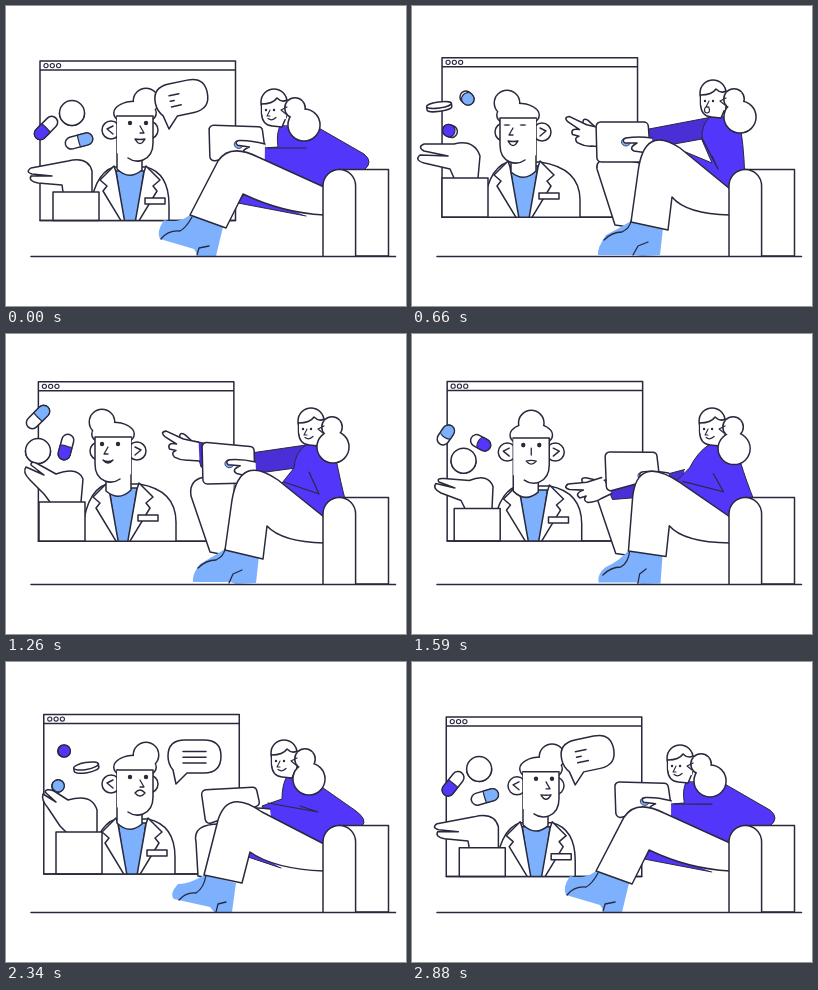
An HTML page with a canvas that plays this animation: 400x300 px, repeating every 2.91 s.

```html
<!DOCTYPE html>
<html lang="en">
<head>
<meta charset="utf-8">
<style>
html, body { margin: 0; width: 100%; height: 100%; overflow: hidden; background: #fff; }
canvas { display: block; }
</style>
</head>
<body>
<canvas id="stage" width="400" height="300"></canvas>
<script>
const ctx = document.getElementById('stage').getContext('2d');
const LOOP = 2910, KEYS = [0, 240, 660, 1260, 1920, 2340];
const INK = '#29293d', VIOLET = '#5236fa', SHADE = '#4a2fd6', BLUE = '#7db1fe', WHITE = '#fff';
const TAU = Math.PI * 2, NUM = /-?[\d.]+/g;
let t = 0;

// Smooth periodic interpolation through one value per key time
function ease(v) {
  const n = KEYS.length;
  const time = i => KEYS[(i + n) % n] + LOOP * Math.floor(i / n);
  const val = i => v[(i + n) % n];
  const rate = i => (val(i + 1) - val(i)) / (time(i + 1) - time(i));
  const slope = i => rate(i - 1) * rate(i) <= 0 ? 0
    : 2 * rate(i - 1) * rate(i) / (rate(i - 1) + rate(i));
  let i = n - 1;
  while (KEYS[i] > t) i--;
  const d = time(i + 1) - time(i), u = (t - time(i)) / d, w = 1 - u;
  return w * w * (1 + 2 * u) * val(i) + u * u * (3 - 2 * u) * val(i + 1)
    + d * u * w * (w * slope(i) - u * slope(i + 1));
}

// Poses are six strings of the same structure, separated by bars
const cache = {};
function pose(text) {
  const p = cache[text] ||= text.split('|').map(s => s.match(NUM).map(Number));
  return p[0].map((_, i) => ease(p.map(q => q[i])));
}
function morph(text) {
  const v = pose(text);
  let i = 0;
  return text.split('|')[0].replace(NUM, () => v[i++].toFixed(2));
}
const ramp = (a, b) => Math.min(1, Math.max(0, (t - a) / (b - a)));

function draw(path, fill, line = 1.5) {
  const p = typeof path === 'string' ? new Path2D(path) : path;
  if (fill) { ctx.fillStyle = fill; ctx.fill(p); }
  if (line) { ctx.lineWidth = line; ctx.stroke(p); }
}
function oval(x, y, rx, ry = rx) {
  const p = new Path2D();
  p.ellipse(x, y, rx, ry, 0, 0, TAU);
  return p;
}
// Overlapping shapes with a single outline; only its outer half stays visible
function union(...shapes) {
  shapes.forEach(s => draw(s, WHITE, 3));
  shapes.forEach(s => draw(s, WHITE, 0));
}
function at(x, y, deg, fn) {
  ctx.save();
  ctx.translate(x, y);
  ctx.rotate(deg * Math.PI / 180);
  fn();
  ctx.restore();
}

function browser(x, y) {
  draw(`M${x} ${y}h195.5v159.5h-195.5z m0 9h195.5`, WHITE);
  for (let i = 0; i < 3; i++) draw(oval(x + 6 + i * 6.3, y + 4.6, 2.1), WHITE, 1.1);
}

function doctorBody(floor) {
  const [x, y, right] = pose('124 163 39|117 168 50|112 158 56|117 152 53|125 157 44|126 159 43');
  ctx.save();
  ctx.beginPath();
  ctx.rect(0, 0, 400, floor);
  ctx.clip();
  at(x, y, 0, () => {
    draw(`M-42 70Q-42 6 -16 -2L16 -2Q${right} 4 ${right} 36V70`, WHITE);
    draw('M-14 2L14 2L5 64L-5 64Z', BLUE);
    for (const side of [-1, 1]) {
      ctx.save();
      ctx.scale(side, 1);
      draw('M16 -3L30 11L23 17L27 22L4 60L14 3Z', WHITE);
      ctx.restore();
    }
    draw('M15 29h20v6h-20z', WHITE);
  });
  ctx.restore();
}

function doctorHead() {
  const [x, y, turn, open] = pose('129 117 1 1|109 124 -.2 0|106 119 -1 0|107 110 -1 1|131 113 1 1|129 115 1 1');
  at(x, y, 0, () => {
    const facing = turn < 0 ? -1 : 1;
    for (const side of [-1, 1]) {
      const ear = side * (24 - 10 * Math.max(0, side * turn));
      draw(oval(ear, 7, 9), WHITE);
      if (side * turn < .5) draw(`M${ear - side * 2} 3L${ear + side * 4} 6L${ear - side * 2} 11`, null, 1.4);
    }
    union(oval(0, -10, 20.5, 11), oval(turn * 11, -22, 12));
    ctx.save();
    ctx.scale(facing, 1);
    // The back of the head runs straight into the neck
    draw('M-18 -7L-18 46Q-6 58 7 47L7 34', WHITE);
    draw('M-18 -7L-18 30L-8 37Q0 40 8 37Q18 33 18 20L18 -7Z', WHITE, 0);
    draw('M-18 -7L18 -7L18 20Q18 33 8 37Q0 40 -7 35', null);
    ctx.restore();
    for (const side of [-1, 1])
      draw(oval(turn * 3 + side * 8, 0, 3.4 - 1.2 * open, .7 + 1.6 * open), INK, 0);
    draw(`M${turn * 5} 3l${turn * 4} 7l${-turn * 4} 0`, null, 1.3);
    const [a, b] = pose('1 9|-6 6|1 9|3 6|-6 6|-6 6');
    draw(`M${turn * 5 - 5} 16q5 ${a} 10 0q-5 ${b} -10 0z`, WHITE, 1.4);
  });
}

function capsule(keys, color) {
  const [x, y, deg, half] = pose(keys);
  const rim = 6 * (1 - half / 8.5);
  at(x, y, deg, () => {
    draw(`M${-half} -6L${half} -6A6 6 0 0 1 ${half} 6L${-half} 6A6 6 0 0 1 ${-half} -6Z`, WHITE);
    draw(`M0 -6L${half} -6A6 6 0 0 1 ${half} 6L0 6A${rim} 6 0 0 1 0 -6Z`, color, 1.2);
  });
}

function pills() {
  const [x, y, ry, deg] = pose('66 107 12.5 0|45 97 12.5 0|27 99 3 -8|32 117 12.5 0|73 132 12.5 0|80 104 3.5 -10');
  at(x, y, deg, () => {
    const thick = 4.5 * (1 - ry / 12.5);
    draw(`M-12.5 0v${thick}A12.5 ${ry} 0 0 0 12.5 ${thick}v${-thick}`, WHITE);
    draw(oval(0, 0, 12.5, ry), WHITE);
  });
  capsule('40 122 135 8|30 122 180 7|38 125 200 1.5|60 113 105 7|73 104 -20 1.5|58 89 0 .3', VIOLET);
  capsule('73 135 -15 8|66 116 28 8|55 92 45 1.5|32 83 -45 8|38 121 -60 1|52 124 -30 .3', BLUE);
}

function doctorHand(floor) {
  draw(morph('M86 186L86 165Q82 150 62 155L25 162Q19 166 26 168L46 170L25 170Q22 175 32 177L56 179L57 186|'
    + 'M79 178L80 150Q72 136 48 147L26 136Q20 136 23 140L38 148L19 143Q17 148 28 156L42 170L46 178|'
    + 'M66 172L68 150Q62 133 42 138L12 138Q5 141 12 145L36 150L8 149Q2 154 12 157L38 163L42 172|'
    + 'M75 168L77 145Q72 132 50 140L32 130Q25 126 25 131L38 141L20 133Q16 138 24 146L38 160L44 168|'
    + 'M85 181L85 160Q80 146 62 152L32 159Q23 162 29 165L48 167L28 166Q24 171 34 172L60 173L61 181|'
    + 'M91 170L91 148Q86 131 62 138L48 129Q40 126 39 130L50 140L37 132Q35 138 42 146L54 164L60 170'), WHITE);
  const [x, y] = pose('47 186|35 178|30 172|33 168|50 181|50 170');
  draw(`M${x} ${y}h46V${floor}h-46z`, WHITE);
}

function bubble() {
  const size = t < 900 ? 1 - ramp(30, 250) : ramp(1650, 1860);
  if (size < .03) return;
  const [x, y, deg, ...text] = pose('163 123 -12 10 4 10|162 125 -12 0 0 0|162 125 0 0 0 0|166 122 0 0 0 0|170 120 0 16 9 11|170 122 0 23 23 23');
  at(x, y, deg, () => {
    ctx.scale(size, size);
    draw('M0 0L-3 -14Q-8 -20 -8 -28Q-8 -44 9 -44L28 -44Q45 -44 45 -28Q45 -11 28 -11L11 -11Z', WHITE);
    text.forEach((w, i) => w > .5 && draw(`M7 ${-32.5 + i * 5.7}h${w}`, null));
  });
}

function farLeg() {
  draw(morph('M214 160Q206 166 206 180L196 208L215 219|M214 146Q190 148 191 168L189 214L208 216|'
    + 'M228 157Q182 146 185 163L203 219L224 222|M228 145Q181 135 185 162L204 218L224 222|'
    + 'M216 146Q181 146 184 165L203 221L215 222|M214 162Q186 162 190 180L192 214L204 216'), WHITE);
}

function farArm() {
  draw(morph('M262 143L245 138L225 135L225 142L245 147L262 150|'
    + 'M270 132L235 133L199 138L203 152L235 150L275 146|'
    + 'M300 111L237 123L190 130L192 145L240 142L290 133|'
    + 'M300 111L245 119L188 107L195 133L245 140L290 134|'
    + 'M245 160L225 172L204 186L210 198L230 185L250 175|'
    + 'M250 150L242 150L235 150L235 158L242 159L250 160'), SHADE, 1);
  const [x, y, deg] = pose('240 138 0|200 147 0|189 131 5|192 117 4|196 186 -55|240 145 0');
  at(x, y, deg, () => {
    ctx.scale(1.1, 1.1);
    draw('M-17 -9Q-19 -17 -13 -14L-4 -7', WHITE, 1.4);
    draw('M0 -8L-14 -10L-30 -16Q-36 -15 -31 -11L-20 -5Q-29 -6 -26 0L-20 1Q-25 3 -21 7Q-14 10 -8 9L2 9', WHITE, 1.4);
  });
}

function tablet() {
  const c = pose('203 119 256 121 259 143 204 156|204 94 257 107 252 137 197 131|'
    + '184 116 236 116 239 156 185 156|196 108 248 113 249 149 197 150|'
    + '190 128 241 124 246 140 192 166|195 128 250 125 254 143 200 163');
  const p = new Path2D();
  p.moveTo((c[0] + c[6]) / 2, (c[1] + c[7]) / 2);
  for (let i = 0; i < 8; i += 2) p.arcTo(c[i], c[i + 1], c[(i + 2) % 8], c[(i + 3) % 8], 4.5);
  p.closePath();
  draw(p, WHITE);
}

function torso() {
  draw(morph('M240 186L232 197L300 210|M266 190L266 192L290 206|M268 190L268 192L290 206|'
    + 'M268 190L268 192L290 206|M264 190L264 192L290 206|M246 188L242 195L275 206'), VIOLET, 1);
  draw(morph('M274 120Q270 128 272 141L257 142L257 155L318 190L358 164Q368 156 358 148L311 121Z|'
    + 'M288 111Q277 119 266 133L259 138L262 150L318 190L338 165Q335 152 325 131L308 112Z|'
    + 'M298 111Q289 118 290 134L300 157L264 142L318 190L333 188Q333 150 329 125L314 111Z|'
    + 'M300 111Q289 118 288 134L276 149L277 153L318 190L339 165Q335 150 330 125L316 111Z|'
    + 'M290 111Q280 119 268 134L257 146L262 152L318 190L344 164Q335 148 326 131L308 112Z|'
    + 'M280 116Q276 124 276 137L256 144L260 152L318 190L356 164Q362 158 350 149L310 121Z'), VIOLET, 1);
  draw(morph('M262 142L290 142L300 142|M268 140L300 152L294 141|M290 132L306 163L300 150|'
    + 'M278 148L313 160L303 138|M265 146L310 155L298 142|M262 141L312 150L294 144'), null, 1.2);
}

function nearHand() {
  const [x, y, deg] = pose('258 145 8|257 131 20|240 139 0|249 135 5|262 157 0|264 154 0');
  at(x, y, deg, () => {
    draw(oval(-26, -3, 4.5, 4), BLUE, .8);
    draw('M0 -7Q-14 -9 -26 -7Q-31 -5 -27 -2L-15 -2Q-24 3 -18 6L2 9', WHITE);
  });
}

function boot() {
  draw(morph('M184 209Q172 218 158 214Q150 226 154 233L188 243L192 250L210 250L217 221|'
    + 'M206 214Q200 220 172 220Q163 226 172 235L205 246L210 250L238 250L239 219|'
    + 'M219 215Q208 222 194 229Q185 242 186 249L222 249L230 250L248 249L251 222|'
    + 'M219 215Q208 222 194 230Q186 240 187 248L224 248L230 250L250 249L253 222|'
    + 'M211 218Q206 232 192 236Q182 240 185 249L222 249L228 250L245 250L245 220|'
    + 'M198 213Q184 222 172 222Q163 232 168 237L204 245L208 250L226 250L230 221'), BLUE, 0);
  draw(morph('M155 233Q162 224 174 225Q180 222 186 211M191 249L193 242L203 240|'
    + 'M180 238Q184 232 196 232Q208 230 208 217M211 250L212 243L230 241|'
    + 'M192 234Q200 226 210 226Q218 222 219 215M221 249L226 240L236 236|'
    + 'M192 234Q200 226 210 226Q218 222 219 215M223 249L227 240L236 236|'
    + 'M188 248Q196 240 206 240Q214 234 214 219M228 250L228 240L230 234|'
    + 'M173 238Q180 230 190 231Q198 226 200 213M210 250L212 242L220 240'), null, 1.3);
}

function nearLeg() {
  draw(morph('M318 181L252 151Q224 137 212 155L184 209L220 222L237 188Q277 207 318 209|'
    + 'M318 182L262 148Q216 122 213 152L207 216L243 220L251 189Q266 206 318 209|'
    + 'M318 183L268 142Q232 118 226 166L219 216L256 224L260 191Q274 208 318 209|'
    + 'M318 183L272 146Q234 119 226 166L219 216L257 225L261 192Q276 208 318 209|'
    + 'M318 183L262 150Q216 122 214 160L211 218L248 220L251 191Q266 208 318 209|'
    + 'M318 182L256 150Q222 126 212 158L198 213L236 221L244 190Q268 207 318 209'), WHITE);
}

function womanHead() {
  const [x, y, px, py] = pose('268 97 298 119|291 88 311 116|301 88 328 111|305 88 327 113|291 88 314 116|278 92 303 117');
  at(x, y, 0, () => {
    draw('M-12.5 0L-12.5 10Q-12 22 -2 23L8 24L16 5L12 -4Z', WHITE);
    draw(oval(0, -1, 13, 13), WHITE);
    draw('M-12 2Q-1 2 3 -5Q8 0 13 -3L12 16L-8 18L-12 10Z', WHITE, 0);
    draw('M-12.5 1Q-1 1 3 -5Q8 0 13 -3', null);
  });
  union(oval(x + 21, y + 5, 9.5), oval(px, py, 15.3));
  at(x, y, 0, () => {
    draw('M13 4l-6 3l5 4', null, 1.2);
    draw(oval(-8, 7, 1.2), INK, 0);
    draw(oval(0, 7, 1.2), INK, 0);
    draw('M-4 7l-3 6l3 0', null, 1.1);
    if (t > 450 && t < 900) draw(oval(-6, 16, 2.5, 3), WHITE, 1.1);
    else draw('M-6 15.5q4 3 8 -1', null, 1.2);
  });
}

function sofa() {
  draw('M333 163.5H382.5V250H333Z', WHITE);
  draw('M317 250V180A16.3 16.5 0 0 1 349.6 180V250', WHITE);
  draw('M25 250.5H389.5', null);
}

function frame(now) {
  t = Math.floor(now / 30) * 30 % LOOP;
  ctx.fillStyle = WHITE;
  ctx.fillRect(0, 0, 400, 300);
  ctx.strokeStyle = INK;
  ctx.lineJoin = ctx.lineCap = 'round';
  const a = t / LOOP * TAU;
  const x = 34 - 4 * Math.sin(a), y = 51.2 + 3.8 * Math.cos(a), floor = y + 159.5;
  browser(x, y);
  doctorBody(floor);
  doctorHead();
  pills();
  doctorHand(floor);
  draw(`M${x} ${floor}h195.5`, null);
  bubble();
  // The far arm drops behind the legs in the second half
  const order = t < 1600 ? [farLeg, farArm] : [farArm, farLeg];
  order.forEach(part => part());
  [tablet, torso, nearHand, boot, nearLeg, womanHead, sofa].forEach(part => part());
  requestAnimationFrame(frame);
}
requestAnimationFrame(frame);
</script>
</body>
</html>
```
